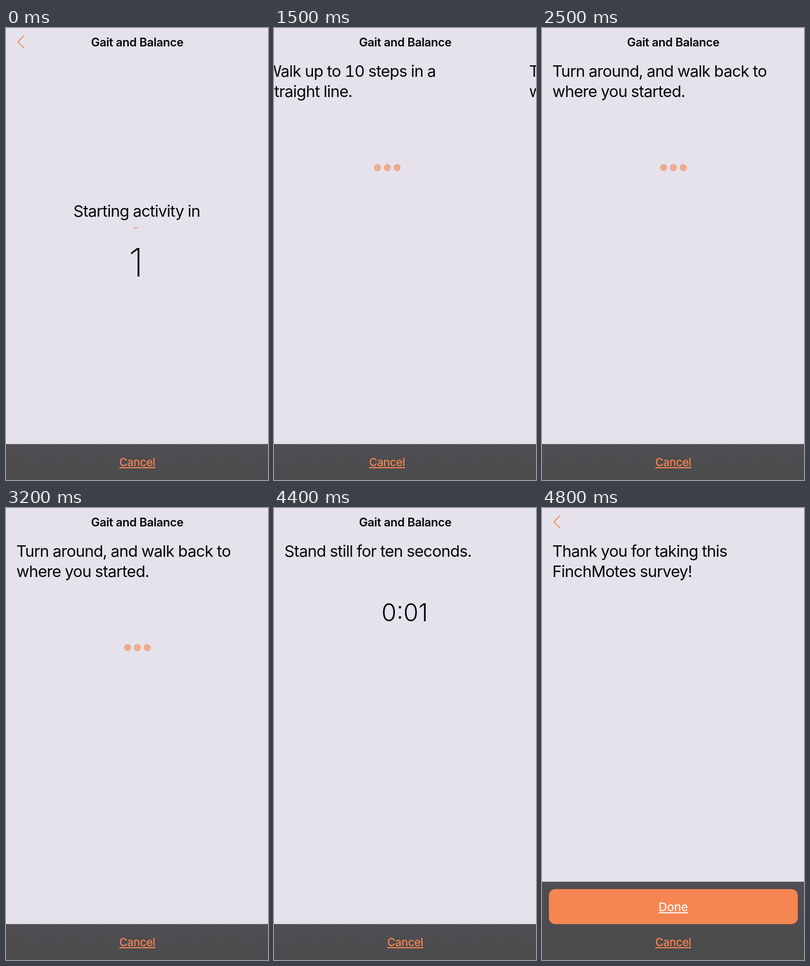
Recreate the animation shown at these times as an HTML page. Size 570 px wide and 982 px high, loop 4.9 s.

```html
<!DOCTYPE html>
<html lang="en">
<head>
<meta charset="utf-8">
<style>
  html, body { margin: 0; width: 100%; height: 100%; overflow: hidden; background: #e5e2eb; }
  svg { display: block; width: 570px; height: 982px; }
  text { font-family: Inter, "Open Sans", sans-serif; fill: #060508; }
  .mid { text-anchor: middle; }
  .title { font-size: 25.5px; font-weight: 600; letter-spacing: -.35px; }
  .body { font-size: 34.5px; letter-spacing: -.85px; font-variant-numeric: tabular-nums; }
  .count { font-size: 85px; font-weight: 200; }
  .timer { font-size: 53px; font-weight: 300; }
  .link { font-weight: 500; letter-spacing: -.35px; text-decoration: underline; }
  .cancel { font-size: 24.2px; fill: #f58651; }
  .done { font-size: 26px; fill: #fbf3f1; }
  .line { fill: none; stroke: #f58651; stroke-width: 2; }
</style>
</head>
<body>
<svg id="stage" viewBox="0 0 570 982"></svg>
<script>
const LOOP = 4900, STEP = 100, PAGE = 572;
const stage = document.getElementById('stage');

const text = (x, y, cls, s) => `<text x="${x}" y="${y}" class="${cls}">${s}</text>`;
const centred = (y, cls, s, x = 285.5) => text(x, y, 'mid ' + cls, s);
const lines = (...rows) => rows.map((s, i) => text(22.5, 106 + 44 * i, 'body', s)).join('');
const title = centred(39.5, 'title', 'Gait and Balance');
const cancel = centred(952, 'link cancel', 'Cancel');
const back = '<path class="line" d="M39 16.5L26 30L39 43.5"/>';

const bar = top => `
  <defs>
    <linearGradient id="grey" x2="0" y2="1"><stop stop-color="#504e52"/><stop offset="1" stop-color="#4b4a4c"/></linearGradient>
    <linearGradient id="shade" x2="0" y2="1"><stop stop-color="#000" stop-opacity="0"/><stop offset="1" stop-color="#000" stop-opacity=".05"/></linearGradient>
  </defs>
  <rect y="${top - 4}" width="570" height="4" fill="url(#shade)"/>
  <rect y="${top}" width="570" height="${982 - top}" fill="url(#grey)"/>`;

// The dots blink between full and pale
function dots(t) {
  const alpha = (t / 210 + .14) % 1 < .5 ? .6 : 1;
  return `<g fill="#f58651" opacity="${alpha}">` +
    [264.5, 286, 307.3].map(x => `<circle cx="${x}" cy="303.3" r="7.7"/>`).join('') + '</g>';
}

const at = (x, content) => `<g transform="translate(${x})">${content}</g>`;
const walk = t => lines('Walk up to 10 steps in a', 'straight line.') + dots(t) + cancel;
const turn = t => lines('Turn around, and walk back to', 'where you started.') + dots(t) + cancel;

function slide(t) {
  const p = Math.min(1, Math.max(0, (t - 1494) / 35.5));
  const x = -PAGE * (1 - Math.cos(Math.PI * p)) / 2;
  return (p < 1 ? at(x, walk(t)) : '') + (p > 0 ? at(x + PAGE, turn(t)) : '');
}

function stand(t) {
  const left = Math.min(10, Math.max(0, Math.ceil((4440 - t) / 110)));
  return lines('Stand still for ten seconds.') +
    centred(246, 'timer', '0:' + String(left).padStart(2, '0'), 284.5) + cancel;
}

function scene(t) {
  if (t < 100) return bar(904) + title + back + cancel +
    centred(410, 'body', 'Starting activity in', 284.5) +
    '<path class="line" d="M278.5 434.3Q282 433.6 286 433.5"/>' +
    centred(540, 'count', '1', 283);
  if (t < 3300) return bar(904) + title + slide(t);
  if (t < 4600) return bar(904) + title + stand(t);
  return bar(812) + (t < 4800 ? '' : back) +
    lines('Thank you for taking this', 'FinchMotes survey!') +
    '<rect x="15" y="828" width="541.5" height="76" rx="14" fill="#f58651"/>' +
    centred(876, 'link done', 'Done') + cancel;
}

let shown = -1;
function draw() {
  const t = Math.floor(performance.now() % LOOP / STEP) * STEP;
  if (t !== shown) stage.innerHTML = scene(shown = t);
  requestAnimationFrame(draw);
}
draw();
</script>
</body>
</html>
```
